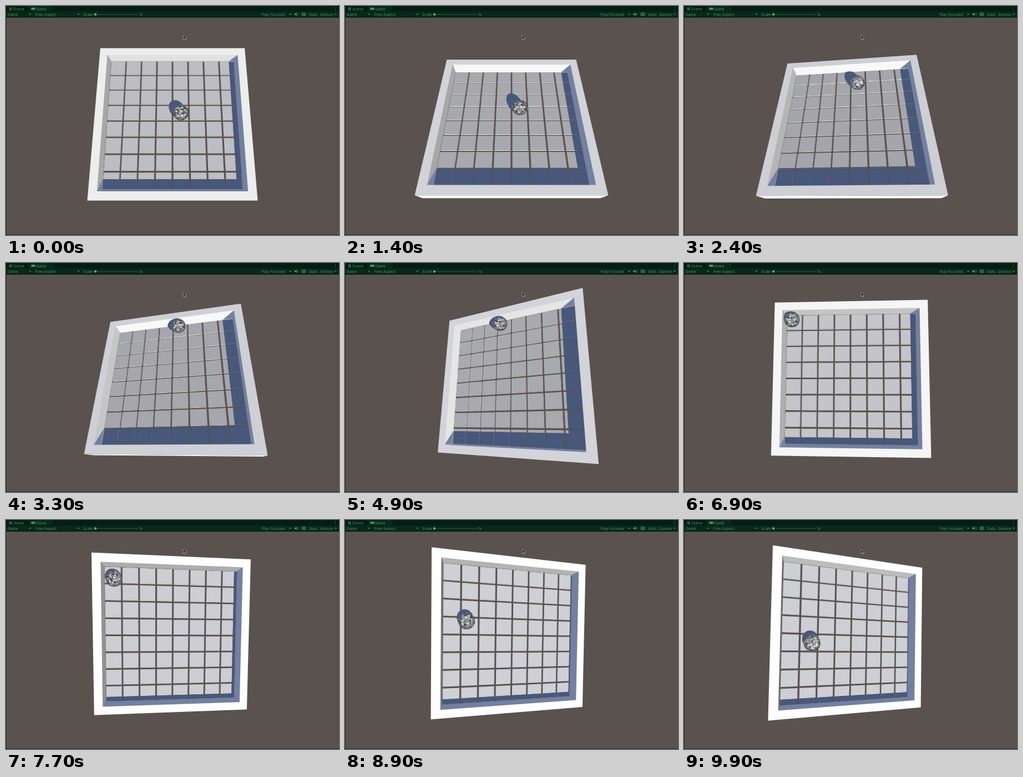
Recreate the animation shown at these times as an HTML page with a canvas. Size 600x414 px, loop 10 s.

```html
<!DOCTYPE html>
<html lang="en">
<head>
<meta charset="utf-8">
<title>Tilting board</title>
<style>
html, body { margin: 0; width: 100%; height: 100%; overflow: hidden; background: #5a524e; }
canvas, svg { position: absolute; left: 0; top: 0; display: block; }
text { font: 6.7px Inter, Roboto, sans-serif; fill: #4a9069; }
</style>
</head>
<body>
<canvas id="view" width="600" height="414"></canvas>
<svg width="600" height="414" viewBox="0 0 600 414">
  <rect width="600" height="21" fill="#08291a"/>
  <rect width="600" height="10" fill="#051e13"/>
  <rect x="41" width="44" height="10" fill="#08291a"/>
  <rect y="20" width="600" height="1" fill="#04170e"/>
  <path d="M.5 21V414M0 413.5H600" stroke="#2b2c29" fill="none"/>
  <g stroke="#4a9069" fill="none" stroke-width=".8">
    <path d="M7 2.5V8M9.5 2.5V8M5.5 4H11M5.5 6.5H11"/>
    <path d="M161 15.5H238" stroke="#2f6347"/>
    <path d="M526 13q1.5 2 0 4M533 12.5h7v5h-7zM533 15h7M535.3 12.5v5M537.7 12.5v5"/>
  </g>
  <g fill="#4a9069">
    <rect x="45" y="3" width="8" height="4" rx="2"/>
    <circle cx="161" cy="15.3" r="2.3" fill="#62a581"/>
    <path d="M41.5 14h4l-2 2.5zM128.5 14h4l-2 2.5zM510 14h4l-2 2.5zM592 14h4l-2 2.5z"/>
    <path d="M519 14h2l3-2v6l-3-2h-2z"/>
    <path d="M593 2h1v1h-1zM593 4.5h1v1h-1zM593 7h1v1h-1z"/>
  </g>
  <text x="13" y="7.5">Scene</text>
  <text x="54" y="7.5">Game</text>
  <text x="3" y="17.5">Game</text>
  <text x="53" y="17.5">Free Aspect</text>
  <text x="139" y="17.5">Scale</text>
  <text x="240" y="17.5">1x</text>
  <text x="460.5" y="17.5">Play Focused</text>
  <text x="545.5" y="17.5">Stats</text>
  <text x="566" y="17.5">Gizmos</text>
  <path d="M319.3 53v7.6l1.8-1.7 1.4 3 1.3-.6-1.4-2.9h2.3z" fill="#111" stroke="#ddd" stroke-width=".6"/>
</svg>
<script>
const ctx = document.getElementById('view').getContext('2d');
const LOOP = 10000, STEP = 100;
const FOCAL = 340, CX = 300, CY = 217;
const PIVOT = [0, -0.064, 2.6];
const LIGHT = [0.41, 0.496, -1];
const RIM = 0.19, FLOOR = 0.03, BASE = -0.01, INNER = 0.895, R = 0.103;
const CELL = 0.225, GAP = 0.0115;
const SHADE = { tile: '#47587b', side: '#5c6a8c', gap: '#4f525f', wall: '#7380a0' };

// time, pitch, roll, twist (degrees)
const TILT = [
  [0, 11.5, 0, 0], [1400, 29, 0, 0], [3300, 24.5, 11.6, 1.1], [4900, 13.1, 22, 0.4],
  [6100, 10.7, 11.2, 0], [7700, -3, -5.6, 0.3], [9900, 0.9, -16, 1.1]
];
// time, board x, board y
const ROLL = [
  [0, 0.11, -0.088], [1400, 0.113, -0.138], [2900, 0.11, -0.79], [3300, 0.103, -0.79],
  [4900, -0.128, -0.79], [6100, -0.65, -0.79], [6800, -0.78, -0.79],
  [7700, -0.75, -0.715], [9900, -0.529, 0.117]
];

const dot = (a, b) => a[0] * b[0] + a[1] * b[1] + a[2] * b[2];
const limit = (v, m) => Math.max(-m, Math.min(m, v));

function sample(keys, t) {
  let i = 0;
  while (i < keys.length - 2 && t >= keys[i + 1][0]) i++;
  const a = keys[i], b = keys[i + 1], span = b[0] - a[0];
  const s = Math.min(1, (t - a[0]) / span);
  const slope = (j, c) => {
    const p = keys[j - 1], q = keys[j + 1];
    return p && q ? (q[c] - p[c]) / (q[0] - p[0]) * span : 0;
  };
  return a.slice(1).map((v, k) => {
    const c = k + 1, w = b[c], m = slope(i, c), n = slope(i + 1, c);
    return v + s * s * (3 - 2 * s) * (w - v) + s * (1 - s) * (1 - s) * m - s * s * (1 - s) * n;
  });
}

let ex, ey, up, tanX, tanY;

function pose(t) {
  const [a, b, c] = sample(TILT, t).map(d => d * Math.PI / 180);
  const sa = Math.sin(a), ca = Math.cos(a), sb = Math.sin(b), cb = Math.cos(b);
  const x = [cb, -sb * sa, -sb * ca], y = [0, ca, -sa];
  const sc = Math.sin(c), cc = Math.cos(c);
  ex = x.map((v, i) => v * cc + y[i] * sc);
  ey = y.map((v, i) => v * cc - x[i] * sc);
  up = [-sb, -sa * cb, -ca * cb];
  const high = dot(LIGHT, up);
  tanX = dot(LIGHT, ex) / high;
  tanY = dot(LIGHT, ey) / high;
}

function project([x, y, z]) {
  const p = PIVOT.map((o, i) => o + ex[i] * x + ey[i] * y + up[i] * z);
  return [CX + FOCAL * p[0] / p[2], CY + FOCAL * p[1] / p[2], FOCAL / p[2]];
}

const lit = n => dot(n, LIGHT) / Math.hypot(...LIGHT);
const level = n => 210 + (lit(n) - 0.53) * 130;
const grey = (v, blue = 0) => `rgb(${v | 0},${v | 0},${v + blue | 0})`;
const cool = v => grey(v, limit(Math.max(0, (230 - v) * 0.35), 7));
const wallColor = n => lit(n) > 0 ? grey(Math.min(248, 226 + (lit(n) - 0.58) * 250)) : SHADE.wall;

function trace(points) {
  points.forEach((p, i) => i ? ctx.lineTo(p[0], p[1]) : ctx.moveTo(p[0], p[1]));
  ctx.closePath();
}

// A thin edge in the same colour hides seams between neighbours
function fill(points, color, edge) {
  ctx.beginPath();
  trace(points.map(project));
  ctx.fillStyle = ctx.strokeStyle = color;
  ctx.fill();
  if (edge) ctx.stroke();
}

function faces(points) {
  const [a, b, c, d] = points.map(project);
  return (c[0] - a[0]) * (d[1] - b[1]) - (c[1] - a[1]) * (d[0] - b[0]) > 0;
}

const rect = (x0, y0, x1, y1, z) => [[x0, y0, z], [x1, y0, z], [x1, y1, z], [x0, y1, z]];
const square = (s, z) => rect(-s, -s, s, s, z);
const flip = v => v.map(k => -k);

// Upright sides below a top rectangle, seen from inside or outside
function sides(top, low, inside, paint) {
  const normals = [ey, flip(ex), flip(ey), ex];
  top.forEach((p, i) => {
    let q = top[(i + 1) % 4], a = p;
    if (!inside) [a, q] = [q, a];
    const quad = [a, q, [q[0], q[1], low], [a[0], a[1], low]];
    if (faces(quad)) fill(quad, paint(inside ? normals[i] : flip(normals[i])), inside);
  });
}

function tiles(shaded) {
  const top = shaded ? SHADE.tile : cool(Math.min(222, level(up) * 0.8));
  const side = n => shaded ? SHADE.side : lit(n) > 0 ? grey(Math.min(230, level(n) * 0.92)) : '#58575c';
  fill(square(INNER, 0), shaded ? SHADE.gap : '#5a534e');
  for (let j = 0; j < 8; j++) for (let i = 0; i < 8; i++) {
    const x = (i - 4) * CELL, y = (j - 4) * CELL;
    const quad = rect(x + GAP, y + GAP, x + CELL - GAP, y + CELL - GAP, FLOOR);
    sides(quad, FLOOR - 0.022, false, side);
    fill(quad, top);
  }
}

// Shadow points that pass a wall climb it along the light ray
function ballShadow(u, v) {
  const long = Math.hypot(1, tanX, tanY), dir = Math.atan2(tanY, tanX);
  const cd = Math.cos(dir), sd = Math.sin(dir), points = [];
  const climb = (p, tan) => tan > 0.03 ? (-INNER - p) / tan : 0;
  for (let i = 0; i < 40; i++) {
    const k = i / 40 * 2 * Math.PI, p = R * long * Math.cos(k), q = R * Math.sin(k);
    const x = u - R * tanX + p * cd - q * sd, y = v - R * tanY + p * sd + q * cd;
    const rise = Math.max(0, climb(x, tanX), climb(y, tanY));
    points.push([limit(x + rise * tanX, INNER), limit(y + rise * tanY, INNER), FLOOR + rise]);
  }
  fill(points, SHADE.tile);
}

let seed = 7;
const random = () => (seed = seed * 16807 % 2147483647) / 2147483647;
const specks = Array.from({ length: 260 }, () => {
  const z = random() * 2 - 1, a = random() * 2 * Math.PI, r = Math.sqrt(1 - z * z);
  return { p: [r * Math.cos(a), r * Math.sin(a), z], size: 0.06 + random() * 0.09,
    color: ['#dcdcdc', '#b9b9ba', '#606367', '#45484c', '#ececec'][random() * 5 | 0] };
});

function ball(u, v) {
  const [x, y, scale] = project([u, v, FLOOR + R]), r = R * scale;
  ctx.save();
  ctx.beginPath();
  ctx.arc(x, y, r, 0, 2 * Math.PI);
  ctx.fillStyle = '#8f9092';
  ctx.fill();
  ctx.clip();
  const a = u / R, b = v / R;
  for (const s of specks) {
    const [px, py, pz] = s.p;
    const qx = px * Math.cos(a) + pz * Math.sin(a), z1 = pz * Math.cos(a) - px * Math.sin(a);
    const qy = py * Math.cos(b) + z1 * Math.sin(b), qz = z1 * Math.cos(b) - py * Math.sin(b);
    if (qz < 0.05) continue;
    ctx.beginPath();
    ctx.ellipse(x + qx * r, y + qy * r, s.size * r, s.size * r * Math.max(0.35, qz), Math.atan2(qy, qx) + Math.PI / 2, 0, 2 * Math.PI);
    ctx.fillStyle = s.color;
    ctx.fill();
  }
  const shade = ctx.createRadialGradient(x, y, r * 0.6, x, y, r);
  shade.addColorStop(0, 'rgba(50,54,62,0)');
  shade.addColorStop(1, 'rgba(50,54,62,.7)');
  ctx.fillStyle = shade;
  ctx.fillRect(x - r, y - r, 2 * r, 2 * r);
  ctx.restore();
}

function draw(t) {
  pose(t);
  const [u, v] = sample(ROLL, t).map(k => limit(k, 0.79));
  const drop = RIM - FLOOR, I = INNER;
  const edgeX = I - Math.max(0, tanX) * drop, edgeY = I - Math.max(0, tanY) * drop;
  const hole = square(I, RIM), outer = square(1, RIM);

  ctx.fillStyle = '#5a524e';
  ctx.fillRect(0, 0, 600, 414);
  sides(outer, BASE, false, wallColor);

  ctx.save();
  ctx.beginPath();
  trace(outer.map(project));
  ctx.clip();
  tiles(false);
  ctx.save();
  ctx.beginPath();
  trace(square(I, FLOOR).map(project));
  trace(rect(-I, -I, edgeX, edgeY, FLOOR).map(project));
  ctx.clip('evenodd');
  tiles(true);
  ctx.restore();
  sides(hole, FLOOR, true, wallColor);
  const cast = ([x, y], foot) => fill([[x, y, RIM], [x, y, FLOOR], [...foot, FLOOR]], SHADE.wall);
  if (ey[2] < 0.05) cast([I, -I], [edgeX, -I]);
  if (ex[2] < 0.3) cast([-I, I], [-I, edgeY]);
  ballShadow(u, v);
  ctx.restore();

  ctx.beginPath();
  trace(outer.map(project));
  trace(hole.map(project));
  ctx.fillStyle = cool(Math.min(254, level(up)));
  ctx.fill('evenodd');
  ball(u, v);
}

const start = performance.now();
function tick() {
  const t = (performance.now() - start) % LOOP;
  draw(Math.floor(t / STEP) * STEP);
  requestAnimationFrame(tick);
}
tick();
</script>
</body>
</html>
```
